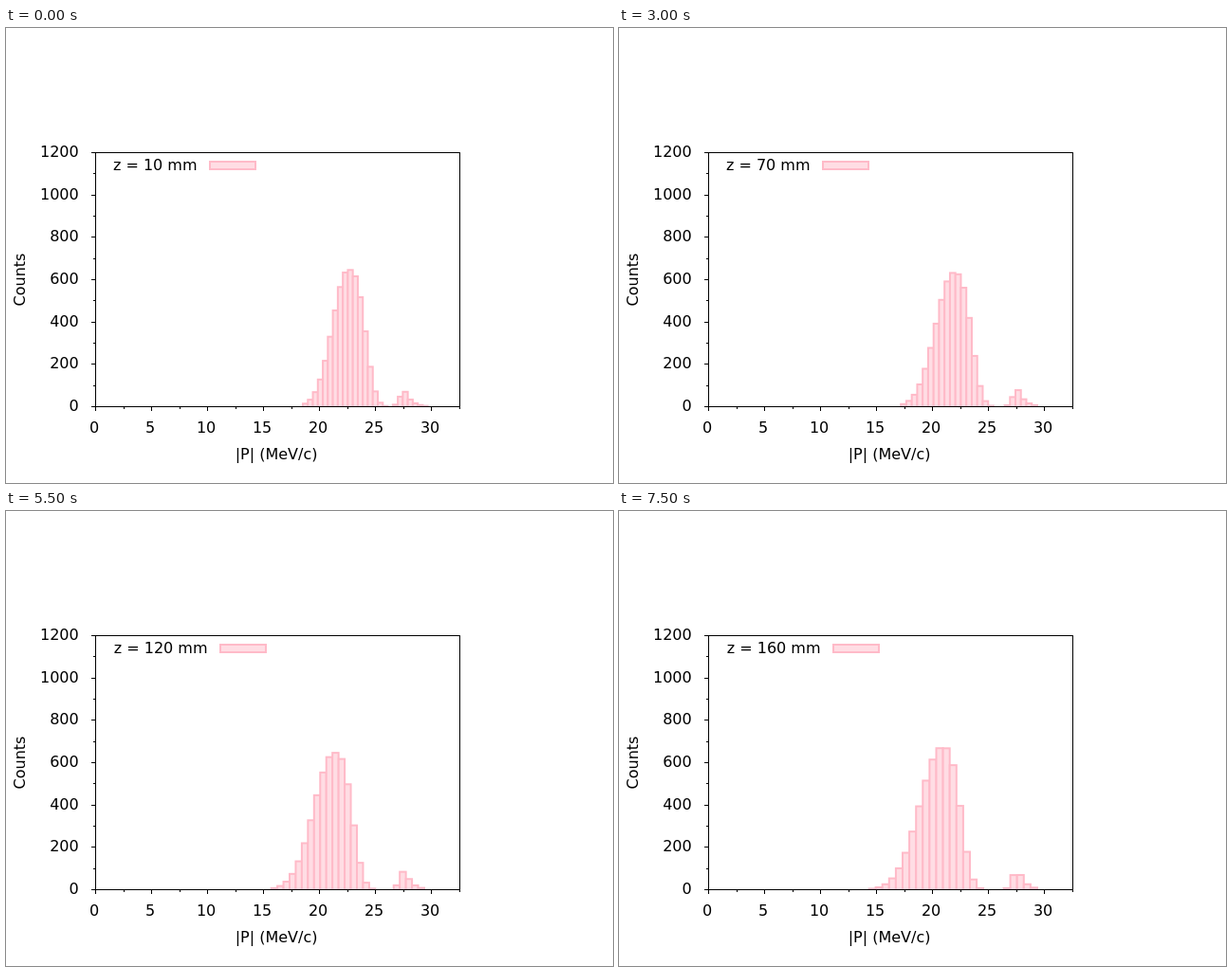
An HTML page with a canvas for the animation above (8000 ms loop, 640 px wide and 480 px high).

```html
<!DOCTYPE html>
<html lang="en">
<head>
<meta charset="utf-8">
<title>Momentum histogram</title>
<style>
  html, body { margin: 0; width: 100%; height: 100%; overflow: hidden; background: #fff; }
  canvas { display: block; }
</style>
</head>
<body>
<canvas id="stage" width="640" height="480"></canvas>
<script>
const ctx = document.getElementById('stage').getContext('2d');
const LOOP = 8000, STEP = 500, BINS = 25;
const LEFT = 94.5, RIGHT = 478.5, TOP = 131.5, BASE = 399.5;
const EDGE = '#ffbac8', FILL = '#ffdde4';

const px = v => LEFT + v * (RIGHT - LEFT) / 32.5;
const py = n => BASE - n * (BASE - TOP) / 1200;
const snap = v => Math.floor(v) + 0.5;

// left edge of the first bin at a few depths [z, x]
const starts = [[10, 313], [50, 303.5], [100, 287.7], [160, 263.5]];

function firstEdge(z) {
  const i = Math.max(1, starts.findIndex(p => p[0] >= z));
  const [z0, x0] = starts[i - 1], [z1, x1] = starts[i];
  return x0 + (x1 - x0) * (z - z0) / (z1 - z0);
}

// bell with its own width and falloff power on each side
function bell(d, left, leftPow, right, rightPow) {
  return d < 0 ? Math.exp(-((-d / left) ** leftPow))
               : Math.exp(-((d / right) ** rightPow));
}

// the main peak drifts left, its lower flank widening with depth
function count(x, z, binWidth) {
  const d = z - 10;
  const height = 633 + 0.0045 * (z - 65) ** 2;
  const main = height * bell(x - 362.4 + 0.134 * z,
    23.3 + 0.05 * d + 0.0001 * d * d, 2, 21.4 + 0.011 * d, 2.8);
  const side = 14.3 * binWidth * bell(x - 420.5, 7, 2, 7.2, 1);
  return main + side;
}

function box(x, y, w, h) {
  ctx.fillStyle = FILL;
  ctx.fillRect(x, y, w, h);
  ctx.strokeStyle = EDGE;
  ctx.lineWidth = 2;
  ctx.strokeRect(x, y, w, h);
}

function line(x1, y1, x2, y2) {
  ctx.beginPath();
  ctx.moveTo(x1, y1);
  ctx.lineTo(x2, y2);
  ctx.stroke();
}

function label(text, x, y, align) {
  ctx.textAlign = align;
  ctx.fillText(text, x, y);
}

function drawBars(z) {
  const start = firstEdge(z), end = z < 70 ? 444.7 : 441;
  const width = (end - start) / BINS;
  ctx.save();
  ctx.beginPath();
  ctx.rect(LEFT, TOP, RIGHT - LEFT, BASE + 0.5 - TOP);
  ctx.clip();
  for (let i = 0; i < BINS; i++) {
    const x = start + i * width;
    const n = count(x + width / 2, z, width);
    if (n > 1.5) box(x, py(n), width, BASE - py(n));
  }
  ctx.restore();
}

function drawAxes() {
  ctx.strokeStyle = ctx.fillStyle = '#000';
  ctx.lineWidth = 1;
  ctx.strokeRect(LEFT, TOP, RIGHT - LEFT, BASE - TOP);
  for (let n = 0; n <= 1200; n += 100) {
    const y = snap(py(n)), major = n % 200 === 0;
    line(LEFT - (major ? 4.5 : 2.5), y, LEFT, y);
    if (major) label(n, 76.7, y + 4.5, 'right');
  }
  for (let v = 0; v <= 32.5; v += 2.5) {
    const x = snap(px(v)), major = v % 5 === 0;
    line(x, BASE, x, BASE + (major ? 4.5 : 2.5));
    if (major) label(v, x - 1.4, 427, 'center');
  }
  label('|P| (MeV/c)', 285.1, 455, 'center');
  ctx.save();
  ctx.translate(20, 265.5);
  ctx.rotate(-Math.PI / 2);
  label('Counts', 0, 0, 'center');
  ctx.restore();
}

function drawKey(z) {
  const shift = z < 100 ? 0 : 11;
  label(`z = ${z} mm`, 201.5 + shift, 150, 'right');
  box(215 + shift, 141, 48, 8);
}

function render(t) {
  const z = 10 * (1 + Math.floor((t % LOOP) / STEP));
  ctx.fillStyle = '#fff';
  ctx.fillRect(0, 0, 640, 480);
  ctx.font = '16px "DejaVu Sans", sans-serif';
  drawBars(z);
  drawAxes();
  drawKey(z);
}

const begin = performance.now();
function tick() {
  render(performance.now() - begin);
  requestAnimationFrame(tick);
}
tick();
</script>
</body>
</html>
```
